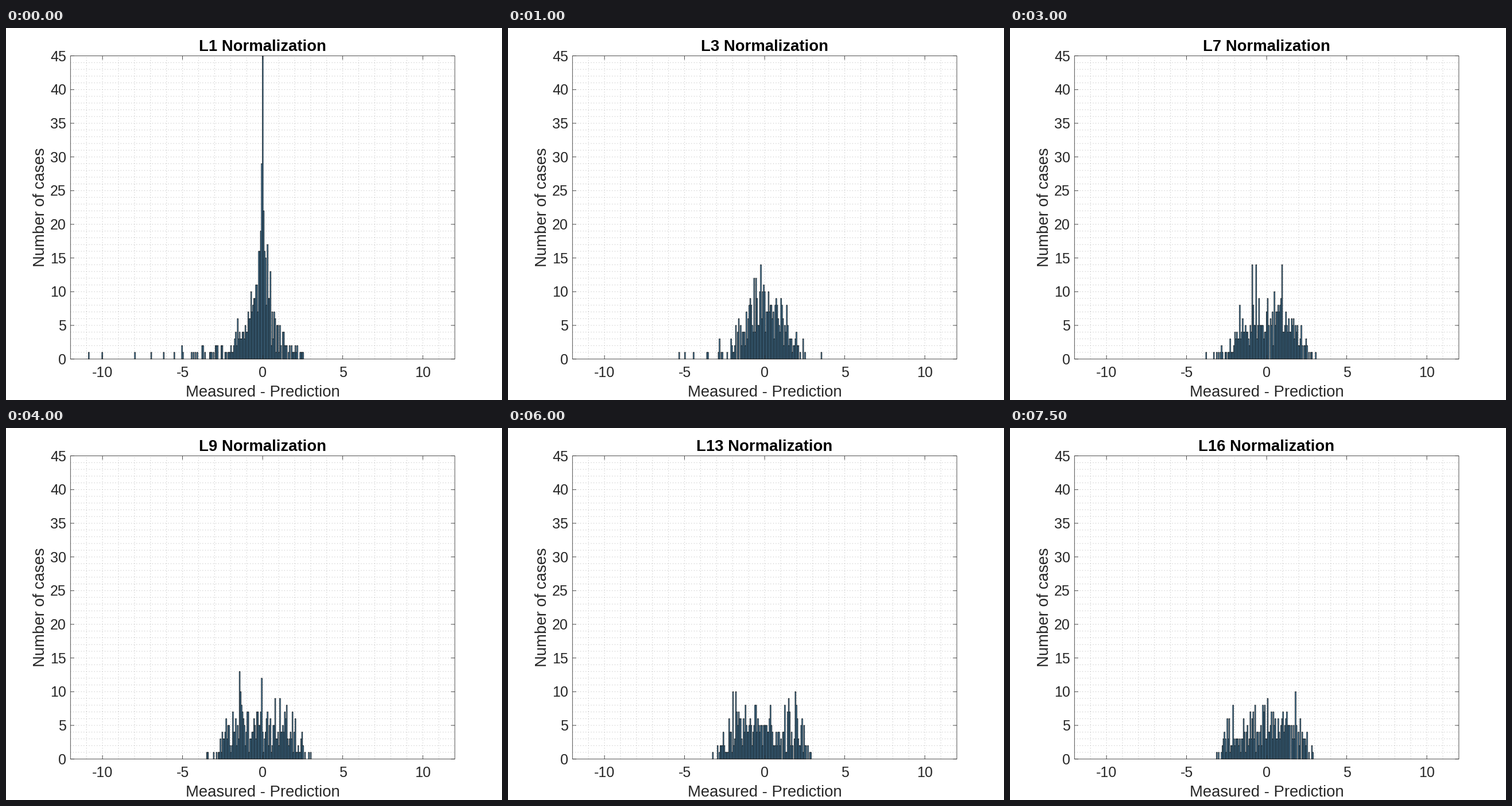
A matplotlib script that plays this animation: 864x648 px, repeating every 8000 ms.

```python
import numpy as np
import matplotlib.pyplot as plt
from matplotlib.animation import FuncAnimation
from matplotlib.collections import LineCollection, PolyCollection

W, H = 864, 648
LEFT, RIGHT, TOP, BASE = 112.3, 781.9, 48.6, 576.7
ZERO, UNIT_X, UNIT_Y = 447.1, 27.9, (BASE - TOP) / 45
BIN = 0.06
BINS = np.arange(-200, 200)
CASES = 400
INK = (0.15, 0.15, 0.15)
THIN = 0.8


def px_x(v):
    return ZERO + UNIT_X * v


def px_y(v):
    return BASE - UNIT_Y * v


def counts(norm):
    """Bar heights: a bell that gets wider and flatter as the norm grows."""
    rng = np.random.default_rng(40 + norm)
    x = (BINS + 0.5) * BIN

    width = 2.8 - 2.55 * np.exp(-norm / 4)
    power = 0.4 + 0.6 * norm
    bell = np.exp(-(np.abs(x) / width) ** power)
    tail = np.where(x < 0, 0.5 / norm * np.exp(-(x / 5) ** 2), 0)
    n = rng.poisson(CASES * bell / bell.sum() + tail)

    # Exact fits pile up at zero for the lowest norms
    spike = 36 * np.exp(-2 * (norm - 1) - 1.5 * np.abs(BINS))
    n = n + np.round(spike).astype(int)

    # The extreme residuals bound the histogram
    low = -(2.55 + 8.25 / norm)
    high = min(1.75 + 0.8 * norm, 2.75 + 2.4 / norm)
    first, last = np.searchsorted(x, [low - BIN / 2, high - BIN / 2])
    n[:first] = 0
    n[last + 1:] = 0
    n[[first, last]] = 1
    return n


def bars(norm):
    n = counts(norm)
    left = px_x(BINS * BIN) - 0.7
    right = left + UNIT_X * BIN
    top = np.maximum(px_y(n), TOP)
    return [[(left[i], BASE), (left[i], top[i]),
             (right[i], top[i]), (right[i], BASE)]
            for i in np.flatnonzero(n)]


plt.rcParams["font.family"] = "Liberation Sans"
fig = plt.figure(figsize=(W / 72, H / 72), dpi=72, facecolor="white")
ax = fig.add_axes([0, 0, 1, 1])
ax.set(xlim=(0, W), ylim=(H, 0))
ax.axis("off")


def add_lines(segments, **style):
    lines = LineCollection(segments, **style)
    lines.set_snap(False)
    ax.add_collection(lines)


def label(x, y, text, size=27.5, **style):
    style = {"color": INK, "ha": "center", "va": "baseline", **style}
    return ax.text(x, y, text, size=size, **style)


grid = [[(px_x(v), BASE), (px_x(v), TOP)] for v in range(-11, 12)]
grid += [[(LEFT, px_y(v)), (RIGHT, px_y(v))] for v in range(1, 45)]
add_lines(grid, colors="#b4b4b4", linewidths=1,
          linestyles=[(0, (1, 3.6))], zorder=1)

hist = PolyCollection([], facecolors="#66aad7", edgecolors="black",
                      linewidths=THIN, zorder=2)
hist.set_snap(False)
ax.add_collection(hist)

frame = [[(LEFT, TOP), (RIGHT, TOP), (RIGHT, BASE), (LEFT, BASE),
          (LEFT, TOP)]]
for v in range(-10, 11, 5):
    x = px_x(v)
    frame += [[(x, BASE), (x, BASE - 6.7)], [(x, TOP), (x, TOP + 6.7)]]
    label(x, 608.5, str(v), size=25)
for v in range(0, 46, 5):
    y = px_y(v)
    frame += [[(LEFT, y), (LEFT + 6.7, y)], [(RIGHT, y), (RIGHT - 6.7, y)]]
    label(105, y + 9, str(v), size=25, ha="right")
add_lines(frame, colors=[INK], linewidths=THIN, zorder=3)

label(447, 642, "Measured - Prediction")
label(67, 312, "Number of cases", rotation=90, rotation_mode="anchor")
title = label(447, 39.5, "", weight="bold", color="black")


def update(i):
    norm = i + 1
    title.set_text(f"L{norm} Normalization")
    hist.set_verts(bars(norm))
    return hist, title


anim = FuncAnimation(fig, update, frames=16, interval=500, repeat=True)
plt.show()
```
